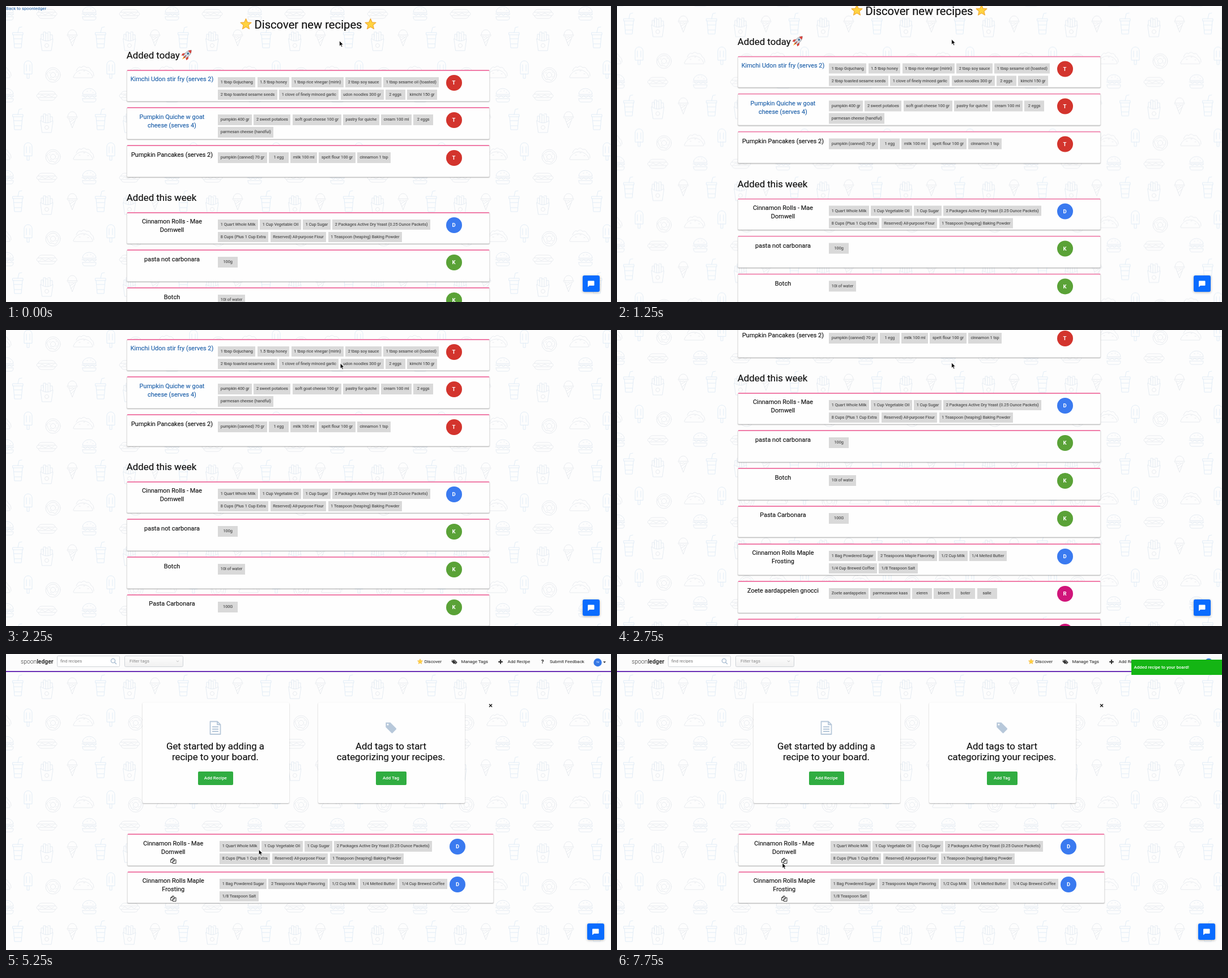
These frames come from a looping animation (1068x524 px, 8000 ms). An HTML page:

```html
<!DOCTYPE html>
<html lang="en">
<head>
<meta charset="utf-8">
<title>Recipe discovery</title>
<style>
  html, body { margin: 0; width: 100%; height: 100%; overflow: hidden; background: #fdfdfd; }
  body { position: relative; font: 400 7.9px/20px Roboto, Arial, sans-serif; color: #111; -webkit-font-smoothing: antialiased; }
  svg, .page, .text, .card, .panel, .button, .field, .face, .chips, .name, #chat, #toast, #status, #edge, #bar { position: absolute; }
  svg { overflow: visible; left: 0; top: 0; }
  .page { left: 0; top: 0; width: 1075px; height: 524px; }
  .text { white-space: nowrap; }
  .mid { transform: translateX(-50%); }
  .big { -webkit-text-stroke: .18px; }
  .nav { color: #333; -webkit-text-stroke: .1px; }

  .card { box-sizing: border-box; height: 56.5px; background: #fefefe; border: 1px solid #e2e2e2; border-top: 2px solid #f07ba8;
    border-radius: 2.5px; box-shadow: 0 1px 1.5px rgba(0,0,0,.28); }
  .name { left: 12.4%; top: 7.5px; transform: translateX(-50%); font-size: 10.95px; line-height: 15.2px; text-align: center;
    white-space: pre; -webkit-text-stroke: .14px; }
  .link { color: #1c5fa9; }
  .chips { left: 25.1%; top: 11px; }
  .chips div { height: 22px; white-space: nowrap; display: flex; }
  .chips span { box-sizing: border-box; min-width: 35px; height: 18.6px; margin-right: 3.2px; padding: 0 4.6px; background: #d9d9d9;
    color: #444; font-size: 7.32px; line-height: 18.8px; text-align: center; -webkit-text-stroke: .1px; }
  .face { left: 90.2%; top: 7px; width: 28px; height: 28px; margin-left: -14px; border-radius: 50%; color: #fff;
    font-weight: 700; font-size: 9.5px; line-height: 28px; text-align: center; }

  #bar { width: 1075px; height: 30px; background: #fcfcfc; border-bottom: 2px solid #6a2fb5; }
  .field { box-sizing: border-box; top: 2.5px; height: 20px; border: 1px solid #cfd3d8; border-radius: 2.5px; background: #fff; }
  .panel { top: 86px; width: 259px; height: 178px; background: #fefefe; border-radius: 2px; box-shadow: 0 1px 2px rgba(0,0,0,.3); }
  .button { top: 207.5px; height: 24.5px; border-radius: 2px; background: #30ad41; color: #fff; font-weight: 500;
    line-height: 24.5px; text-align: center; }

  #edge { left: 1067px; top: 0; width: 1px; height: 524px; background: #ececec; }
  #chat { top: 476.5px; width: 29.5px; height: 29.5px; border-radius: 3px; background: #0a6cff; box-shadow: 0 1px 4px rgba(0,0,0,.3); }
  #toast { left: 908px; top: 10px; width: 167px; height: 27px; background: #14b514; color: #fff; font-weight: 500;
    line-height: 27px; text-indent: 4.5px; white-space: nowrap; }
  #status { left: 0; top: 515.5px; width: 357px; height: 9px; background: #dedede; border: solid #b9b9b9; border-width: 1px 1px 0 0;
    border-radius: 0 2px 0 0; font: 5.8px/9px "Noto Sans", sans-serif; color: #222; text-indent: 1.5px; white-space: nowrap; }
</style>
</head>
<body>
<svg id="paper" width="1075" height="1300">
  <defs>
    <pattern id="food" patternUnits="userSpaceOnUse" x="-44" y="30" width="146" height="145" viewBox="-44 30 146 145">
      <g fill="none" stroke="#e8ebef" stroke-linejoin="round" stroke-linecap="round">
        <g transform="translate(21 57)" stroke="#e1ecf6">
          <path d="M-9-10H9V-6H-9ZM-8-6L-6 17H6L8-6M-7 1H7M-6 10H6M0-10L2-19L7-20"/>
        </g>
        <g transform="translate(-29 54)">
          <path d="M-8-3A8 9 0 1 1 8-3ZM-9-3Q-9 1-5 0Q-2 3 0 0Q3 3 5 0Q9 1 9-3M-6 1L0 17L6 1M-4 6L3 2M-2 11L5 4"/>
        </g>
        <g transform="translate(72 62)">
          <path d="M-11-4Q0 4 11-4L8 17H-8ZM-10-4V-12H-6V-2M-6-8V-16H-2V0M-2-14H2V0M2-16H6V-2M6-11H10V-4" stroke="#e4ebf2"/>
          <circle cy="8" r="3.5"/>
        </g>
        <g transform="translate(39 112)" stroke="#e1ecf6">
          <path d="M-7 8V-8A7 7 0 0 1 7-8V8ZM-2 8V16H2V8M-3-8V3M3-8V3"/>
        </g>
        <g transform="translate(83 122)">
          <circle r="13"/><circle r="4.5"/>
          <path d="M-11-2Q-9 4-6 8Q0 7 4 10Q10 5 10-2Q7-10 0-10Q-8-9-11-2M-7-3L-5-5M5-6L7-4M-5 4L-3 6M5 4L7 3"/>
        </g>
        <g transform="translate(-9 117)">
          <path d="M-18 8A18 18 0 0 1 16 8Q17 10 14 10H-16Q-19 10-18 8M-13-2Q-9-12-4-8Q0-13 5-8Q11-10 13-3Q18-1 18 7M-8 2H-6M0-2H2M7 3H9"/>
        </g>
        <g transform="translate(1 159)" stroke="#e4ebf2">
          <path d="M-12-3A12 10 0 0 1 12-3ZM-13 0H13L9 3L5 0L1 3L-3 0L-7 3L-11 0M-12 5H12Q12 11 8 11H-8Q-12 11-12 5M-4-8H-3M2-9H3M6-6H7"/>
        </g>
        <g transform="translate(72 159)">
          <path d="M-16-3H16Q20 0 16 3H-16Q-20 0-16-3M-15-3Q-14-8-9-8H9Q14-8 15-3M-15 3Q-14 8-9 8H9Q14 8 15 3M-12 1Q-9-3-6 0T0 0T6 0T12-1"/>
        </g>
      </g>
    </pattern>
    <path id="star" d="M0-10L2.7-3.7L9.5-3.1L4.4 1.4L5.9 8.1L0 4.6L-5.9 8.1L-4.4 1.4L-9.5-3.1L-2.7-3.7Z"
      fill="#ffd340" stroke="#f2ab35" stroke-width="1.2" stroke-linejoin="round"/>
    <path id="tag" d="M-9-9H-1L9 1Q10 2 9 3L3 9Q2 10 1 9L-9-1ZM-5.5-7A1.5 1.5 0 1 0-5.4-7Z" fill-rule="evenodd"/>
    <path id="copy" d="M-4.5-1.5L-1.5-4.5H1V-1.8M-4.5-1.5V3H-.8M-1.5-4.5V-1.5H-4.5M-.8 1L2-1.8H4.8V4.8H-.8ZM2-1.8V1H-.8"
      fill="none" stroke="#111" stroke-width=".9" stroke-linejoin="round"/>
  </defs>
  <rect width="1075" height="1300" fill="url(#food)"/>
</svg>

<div class="page" id="discover">
  <svg width="1067" height="524">
    <use href="#star" transform="translate(423.5 32.5)"/>
    <use href="#star" transform="translate(643.5 32.5)"/>
    <g transform="translate(319.5 86) rotate(45)">
      <path d="M-2 5L0 12L2 5Z" fill="#ffa928"/>
      <path d="M-3-1L-7 4L-6 8L-2 5ZM3-1L7 4L6 8L2 5Z" fill="#d8433c"/>
      <path d="M0-11C5-6 4.5 1 2.8 6H-2.8C-4.5 1-5-6 0-11Z" fill="#d5dbe1" stroke="#7c8891" stroke-width=".7"/>
      <path d="M0-11Q2.6-8.5 3.2-6H-3.2Q-2.6-8.5 0-11Z" fill="#d8433c"/>
      <circle cy="-2.5" r="1.8" fill="#3f6f96"/>
      <path d="M0 2V8" stroke="#b2332f" stroke-width="1.4"/>
    </g>
  </svg>
</div>

<div class="page" id="board">
  <div id="bar"></div>
  <div class="field" style="left:90px;width:111px"></div>
  <div class="field" style="left:209px;width:104px;background:linear-gradient(#fdfdfd,#f1f1f1)"></div>
  <div class="panel" style="left:240.5px"></div>
  <div class="panel" style="left:550.5px"></div>
  <div class="button" style="left:338.5px;width:62.5px">Add Recipe</div>
  <div class="button" style="left:652.5px;width:54px">Add Tag</div>
  <svg width="1075" height="524">
    <g fill="none" stroke="#a6bbd0" stroke-width="1.4"><circle cx="189" cy="12" r="3.6"/><path d="M191.7 14.7L195 18"/></g>
    <path d="M301 11.8L303 13.8L305 11.8" fill="none" stroke="#aaa" stroke-width=".8"/>
    <use href="#star" transform="translate(731 13.5) scale(.48)"/>
    <g fill="#333">
      <use href="#tag" transform="translate(792.5 14) scale(.43)"/>
      <use href="#tag" transform="translate(790 14) scale(.43)" stroke="#fcfcfc" stroke-width="1.5"/>
      <path d="M871.9 10H874.1V12.7H876.8V14.9H874.1V17.6H871.9V14.9H869.2V12.7H871.9Z"/>
      <path d="M1054 13.2H1059L1056.5 16Z"/>
    </g>
    <circle cx="1044.5" cy="15" r="7.2" fill="#3578e5"/>
    <g fill="none" stroke="#b7c8da" stroke-width="1.8" stroke-linejoin="round">
      <path d="M360.5 119.5H373L378.5 125V142H360.5ZM373 119.5V125H378.5M364 129H375M364 133H375M364 137H375"/>
    </g>
    <use href="#tag" transform="translate(679.5 130.5) scale(1.02)" fill="#b7c8da"/>
    <path d="M853 88.7L858 93.7M858 88.7L853 93.7" stroke="#111" stroke-width="1.3"/>
  </svg>
  <div id="toast">Added recipe to your board!</div>
</div>

<div id="edge"></div>
<div id="chat"><svg width="30" height="30"><path d="M10 9.5H19.5Q20.5 9.5 20.5 10.5V17Q20.5 18 19.5 18H12L9 20.5V10.5Q9 9.5 10 9.5Z" fill="#fff"/></svg></div>
<div id="status"><span id="address">https://app.spoonledger.test/dessertfan27</span></div>
<svg id="cursor" width="8" height="12"><path d="M0 0V9.2L2.1 7.3L3.6 10.7L5.2 10L3.7 6.7H6.6Z" fill="#000" stroke="#fff" stroke-width=".7"/></svg>

<script>
const $ = id => document.getElementById(id);
const discover = $('discover'), board = $('board');

function add(parent, cls, text = '', css = {}) {
  const el = document.createElement('div');
  el.className = cls;
  el.textContent = text;
  Object.assign(el.style, css);
  parent.append(el);
  return el;
}

// y is the middle of the line
const write = (parent, text, x, y, size = 7.9, cls = '', css = {}) =>
  add(parent, 'text ' + cls, text, { left: x + 'px', top: y - 10 + 'px', fontSize: size + 'px', ...css });

const faces = { T: '#d3342d', D: '#3a7af0', K: '#5aa237', R: '#d0157a' };

// In names and chips "|" starts a new line, "," separates chips
function card(parent, y, name, chips, face, cls = '') {
  const wide = parent === board;
  const el = add(parent, 'card', '', { left: (wide ? 214.3 : 212.7) + 'px', top: y + 'px', width: (wide ? 647 : 641.5) + 'px' });
  add(el, 'name ' + cls, name.replace('|', '\n'));
  const box = add(el, 'chips');
  for (const line of chips.split('|')) {
    const row = add(box, '');
    for (const chip of line.split(',')) {
      const span = document.createElement('span');
      span.textContent = chip;
      row.append(span);
    }
  }
  add(el, 'face', face, { background: faces[face] });
  return el;
}

const rolls = ['Cinnamon Rolls - Mae|Dornwell',
  '1 Quart Whole Milk,1 Cup Vegetable Oil,1 Cup Sugar,2 Packages Active Dry Yeast (0.25 Ounce Packets)|' +
  '8 Cups (Plus 1 Cup Extra,Reserved) All-purpose Flour,1 Teaspoon (heaping) Baking Powder', 'D'];
const frosting = split => ['Cinnamon Rolls Maple|Frosting',
  '1 Bag Powdered Sugar,2 Teaspoons Maple Flavoring,1/2 Cup Milk,1/4 Melted Butter' +
  (split ? '|1/4 Cup Brewed Coffee,' : ',1/4 Cup Brewed Coffee|') + '1/8 Teaspoon Salt', 'D'];

const today = [
  ['Kimchi Udon stir fry (serves 2)', '1 tbsp Gojuchang,1.5 tbsp honey,1 tbsp rice vinegar (mirin),2 tbsp soy sauce,1 tbsp sesame oil (toasted)|' +
    '2 tbsp toasted sesame seeds,1 clove of finely minced garlic,udon noodles 300 gr,2 eggs,kimchi 150 gr', 'T', 'link'],
  ['Pumpkin Quiche w goat|cheese (serves 4)', 'pumpkin 400 gr,2 sweet potatoes,soft goat cheese 100 gr,pastry for quiche,cream 100 ml,2 eggs|' +
    'parmesan cheese (handful)', 'T', 'link'],
  ['Pumpkin Pancakes (serves 2)', 'pumpkin (canned) 70 gr,1 egg,milk 100 ml,spelt flour 100 gr,cinnamon 1 tsp', 'T']
];
const week = [
  rolls,
  ['pasta not carbonara', '100g', 'K'],
  ['Botch', '10l of water', 'K'],
  ['Pasta Carbonara', '100G', 'K'],
  frosting(true),
  ['Zoete aardappelen gnocci', 'Zoete aardappelen,parmezaanse kaas,eieren,bloem,boter,salie', 'R'],
  ['Zoete pompoensoep', 'pompoen,room', 'R']
];
const pitch = 66.75;

write(discover, 'Back to spoonledger', 0, 5, 7.8, 'link');
write(discover, 'Discover new recipes', 533.5, 32.5, 20.2, 'big mid');
write(discover, 'Added today', 212.7, 87, 16.87, 'big');
write(discover, 'Added this week', 212.7, 339, 16.87, 'big');
today.forEach((r, i) => card(discover, 112.5 + i * pitch, ...r));
week.forEach((r, i) => card(discover, 364.7 + i * pitch, ...r));

const logo = write(board, 'spoon', 26, 13.5, 10.3, '', { color: '#333', fontWeight: 300 });
logo.append(Object.assign(document.createElement('b'), { textContent: 'ledger' }));
write(board, 'find recipes', 96, 12.5, 7.4, '', { color: '#777' });
write(board, 'Filter tags', 218, 12.5, 7.9, '', { color: '#888' });
[['Discover', 738.5], ['Manage Tags', 803.5], ['Add Recipe', 885.5], ['Submit Feedback', 960]]
  .forEach(([label, x]) => write(board, label, x, 13.5, 7.9, 'nav'));
write(board, '?', 944.8, 13.5, 9.5, 'nav', { fontWeight: 700 });
write(board, 'TV', 1044.5, 15, 4, 'mid', { color: '#fff', fontWeight: 500 });
write(board, 'Get started by adding a', 369.5, 163, 16.8, 'big mid');
write(board, 'recipe to your board.', 369.5, 181.7, 16.8, 'big mid');
write(board, 'Add tags to start', 679.5, 163, 16.8, 'big mid');
write(board, 'categorizing your recipes.', 679.5, 181.7, 16.8, 'big mid');

const saved = [rolls, frosting(false)].map((r, i) => {
  const el = card(board, 318 + i * pitch, ...r);
  el.insertAdjacentHTML('beforeend', '<svg width="10" height="10"><use href="#copy" transform="translate(80.2 46)"/></svg>');
  return el;
});
board.append($('toast'));

// time, scroll, pointer x, pointer y
const steps = [
  [0, 0, 588.7, 61.7], [1000, 7, 589.5, 60], [1250, 24.5, 590.7, 59], [1500, 56, 590.7, 59],
  [1750, 82, 590.7, 59], [2000, 82, 590.2, 59], [2250, 97, 590.2, 59], [2500, 188, 590.5, 58.5],
  [2750, 254, 590.7, 58], [3000, 254, 694, 102.5], [3250, 254, 780, 136.3], [3500, 254, 785.3, 136.5],
  [3750, 254, 787.5, 137.3], [4000, 254, 790.3, 138.3], [4500, 0, 790.3, 139], [5000, 0, 735, 155.5],
  [5250, 0, 446.3, 346.3], [5500, 0, 380.3, 351.5], [5750, 0, 344, 357.5], [6250, 0, 302, 373],
  [6500, 0, 287.5, 370], [6750, 0, 292, 370]
];
const show = (el, on) => { el.style.visibility = on ? 'inherit' : 'hidden'; };

const start = performance.now();
function draw() {
  const t = (performance.now() - start) % 8000;
  const [, scroll, x, y] = steps.findLast(s => s[0] <= t);
  const onBoard = t >= 4500;
  $('paper').style.transform = discover.style.transform = `translateY(${-scroll}px)`;
  $('cursor').style.transform = `translate(${x}px, ${y}px)`;
  show(discover, !onBoard);
  show(board, onBoard);
  show($('edge'), !onBoard);
  saved.forEach(el => show(el, t >= 5250));
  $('chat').style.left = (onBoard ? 1026 : 1018) + 'px';
  show($('status'), t >= 3250 && t < 4750);
  $('address').style.opacity = t < 3500 ? .5 : 1;
  $('toast').style.opacity = t < 7500 ? 0 : t < 7750 ? .6 : 1;
  requestAnimationFrame(draw);
}
draw();
</script>
</body>
</html>
```
